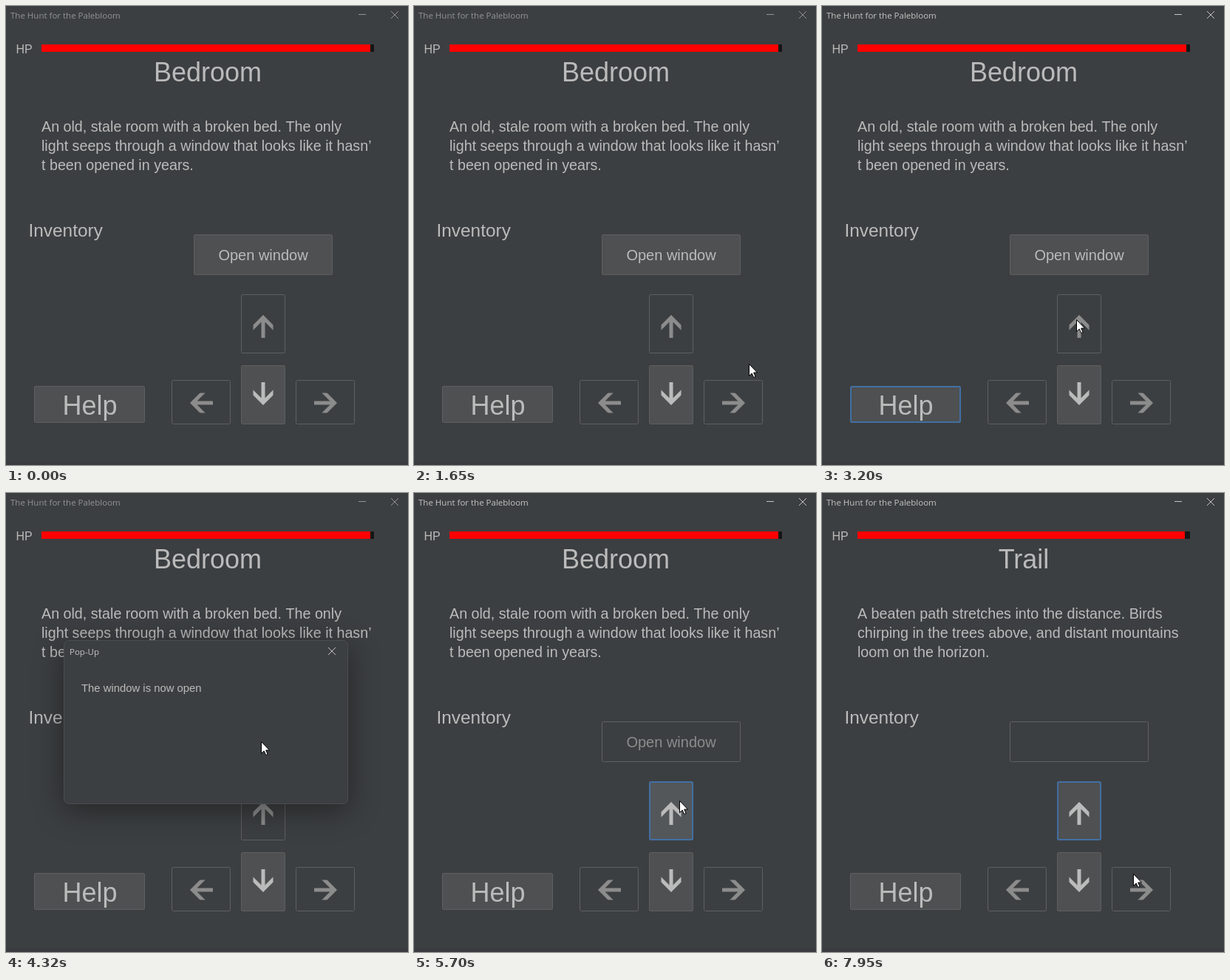
Animation of 544 by 621 pixels, one loop 7.99 s. Source, as an HTML page with a canvas:

```html
<!DOCTYPE html>
<html lang="en">
<head>
<meta charset="utf-8">
<title>Text adventure</title>
<style>
  html, body { margin: 0; width: 100%; height: 100%; overflow: hidden; background: #3c3f41; }
  canvas { display: block; }
</style>
</head>
<body>
<canvas id="stage" width="544" height="621"></canvas>
<script>
const ctx = document.getElementById('stage').getContext('2d');
const LOOP = 7990;
const SANS = '"Liberation Sans", Arial, sans-serif';
const UI = '"Open Sans", "Noto Sans", sans-serif';
const BG = '#3c3f41', FG = '#bbbbbb', DIM = '#8c8c8c', BRIGHT = '#c4c4c4';

// Moments at which the state changes, in ms
const ENTER = 600, ACTIVATE = 2820, POPUP = 4180, CLOSE = 5180, PRESS = 7210, TRAVEL = 7250;

const rooms = {
  bedroom: {
    name: 'Bedroom', hp: 445, action: 'Open window',
    text: ['An old, stale room with a broken bed. The only',
      'light seeps through a window that looks like it hasn’',
      't been opened in years.']
  },
  trail: {
    name: 'Trail', hp: 443, action: '',
    text: ['A beaten path stretches into the distance. Birds',
      'chirping in the trees above, and distant mountains',
      'loom on the horizon.']
  }
};

const rect = (x, y, w, h) => ({ x, y, w, h });
const actionBox = rect(254, 309, 188, 55);
const helpBox = rect(38, 514, 150, 50);
const upBox = rect(318, 390, 60, 80);
const downBox = rect(318, 486, 60, 80);
const leftBox = rect(224, 506, 80, 60);
const rightBox = rect(392, 506, 80, 60);

const clamp01 = v => Math.max(0, Math.min(1, v));
const progress = (t, from, to) => clamp01((t - from) / (to - from));
const smooth = u => u * u * (3 - 2 * u);
const easeOut = u => 1 - (1 - u) ** 3;

// Eased straight move to a point
const glide = (from, to, x, y) => ({
  from, to,
  at: (u, p) => ({ x: p.x + (x - p.x) * smooth(u), y: p.y + (y - p.y) * smooth(u) })
});

// Clockwise sweep on an ellipse, angles in turns, blending out of the previous point
const orbit = (from, to, cx, cy, rx, ry, angle, sweep) => {
  const point = u => {
    const a = (angle + sweep * u) * 2 * Math.PI;
    return { x: cx + rx * Math.cos(a), y: cy + ry * Math.sin(a) };
  };
  return {
    from, to,
    at: (u, p) => {
      const q = point(u), o = point(0);
      return { x: q.x + (p.x - o.x) * (1 - u), y: q.y + (p.y - o.y) * (1 - u) };
    }
  };
};

const entry = { x: 480, y: 545 };
const moves = [
  orbit(ENTER, 1370, 385, 488, 98, 103, 0.1, 0.75),
  glide(1400, 1650, 453, 484),
  orbit(1650, 2190, 368, 438, 84, 54, 0.08, 0.85),
  orbit(2210, 2440, 335, 440, 46, 26, 0, 0.75),
  glide(2440, 2520, 344, 424),
  glide(3660, 4000, 345, 336),
  glide(4460, 5000, 441, 214),
  glide(CLOSE, 5700, 359, 416),
  glide(5700, 5940, 345, 455),
  orbit(5980, 6700, 340, 425, 47, 34, 0.25, 1),
  glide(6700, 6830, 338, 435),
  glide(7690, 7950, 421, 515)
];

function pointerAt(t) {
  if (t < ENTER) return null;
  const p = moves.filter(m => t >= m.from)
    .reduce((at, m) => m.at(progress(t, m.from, m.to), at), entry);
  return { x: Math.round(p.x), y: Math.round(p.y) };
}

function label(str, x, y, font, color = FG, align = 'left') {
  ctx.font = font;
  ctx.fillStyle = color;
  ctx.textAlign = align;
  ctx.fillText(str, x, y);
}

function box(x, y, w, h, r) {
  ctx.beginPath();
  ctx.roundRect(x, y, w, h, r);
}

function cross(x, y, color) {
  ctx.strokeStyle = color;
  ctx.lineWidth = 1;
  ctx.beginPath();
  for (const s of [-1, 1]) {
    ctx.moveTo(x - 5, y - 5 * s);
    ctx.lineTo(x + 5, y + 5 * s);
  }
  ctx.stroke();
}

function button({ x, y, w, h }, { enabled = true, focus, hover, press } = {}) {
  box(x, y, w, h, 2.5);
  ctx.fillStyle = !enabled ? BG : press ? '#5a5e60' : hover ? '#53575a' : '#4e5051';
  ctx.fill();
  const line = focus ? 2 : 1;
  box(x + line / 2, y + line / 2, w - line, h - line, 2);
  ctx.lineWidth = line;
  ctx.strokeStyle = focus ? '#426fa3' : '#5e6060';
  ctx.stroke();
}

// Arrow centred on a point: a stem and a chevron cut off at both sides
function arrow(x, y, turns, enabled) {
  ctx.save();
  ctx.translate(x, y);
  ctx.rotate(turns * Math.PI / 2);
  ctx.beginPath();
  ctx.rect(-13.5, -15.5, 27, 31);
  ctx.clip();
  ctx.beginPath();
  ctx.moveTo(-20, 8);
  ctx.lineTo(0, -12);
  ctx.lineTo(20, 8);
  ctx.moveTo(0, -11);
  ctx.lineTo(0, 16);
  ctx.lineWidth = 5;
  ctx.strokeStyle = enabled ? FG : DIM;
  ctx.stroke();
  ctx.restore();
}

function titleBar(active) {
  const color = active ? BRIGHT : '#929394';
  label('The Hunt for the Palebloom', 6, 17, '11.5px ' + UI, color);
  ctx.fillStyle = color;
  ctx.fillRect(477, 11, 10, 1);
  cross(526, 12, color);
}

function popup(t, pointer) {
  const shown = easeOut(progress(t, POPUP, POPUP + 140)) * (1 - progress(t, CLOSE, CLOSE + 120));
  if (shown <= 0) return;
  const scale = 0.94 + 0.06 * shown;
  ctx.save();
  ctx.globalAlpha = shown;
  ctx.translate(270.5, 310);
  ctx.scale(scale, scale);
  ctx.translate(-270.5, -310);

  ctx.save();
  ctx.shadowColor = 'rgba(0,0,0,0.42)';
  ctx.shadowBlur = 40;
  ctx.shadowOffsetY = 9;
  box(78, 199, 385, 221, 7);
  ctx.fillStyle = BG;
  ctx.fill();
  ctx.restore();

  const onClose = t < CLOSE && pointer.x >= 418 && pointer.y < 229;
  if (onClose) {
    box(418, 199, 45, 30, [0, 7, 0, 0]);
    ctx.fillStyle = '#c42b1c';
    ctx.fill();
  }
  box(78.5, 199.5, 384, 221, 7);
  ctx.strokeStyle = '#4b4e50';
  ctx.lineWidth = 1;
  ctx.stroke();
  label('Pop-Up', 86, 219, '11.5px ' + UI, BRIGHT);
  cross(441, 214, onClose ? '#ffffff' : BRIGHT);
  label('The window is now open', 102, 269, '14.85px ' + SANS);
  ctx.restore();
}

function cursor({ x, y }) {
  ctx.save();
  ctx.translate(x + 0.5, y + 0.5);
  ctx.fill(pointerShape);
  ctx.stroke(pointerShape);
  ctx.restore();
}
const pointerShape = new Path2D('M0 0V16L3.7 12.5L6.2 18L8.6 17L6.2 11.5H11Z');

function draw(t) {
  const room = t < TRAVEL ? rooms.bedroom : rooms.trail;
  const pointer = pointerAt(t);
  const opened = t >= POPUP, closed = t >= CLOSE;
  const modal = opened && !closed;
  const over = r => pointer && !modal &&
    pointer.x >= r.x && pointer.x < r.x + r.w && pointer.y >= r.y && pointer.y < r.y + r.h;

  ctx.fillStyle = BG;
  ctx.fillRect(0, 0, 544, 621);
  ctx.fillStyle = '#393b40';
  ctx.fillRect(0, 616, 544, 5);
  titleBar(t >= ACTIVATE && !modal);

  label('HP', 13.5, 64, '16px ' + SANS);
  ctx.fillStyle = '#161616';
  ctx.fillRect(48, 52, 450, 10);
  ctx.fillStyle = '#ff0000';
  ctx.fillRect(48, 52, room.hp, 10);

  label(room.name, 273, 102, '36px ' + SANS, FG, 'center');
  room.text.forEach((row, i) => label(row, 48, 170 + 26 * i, '19.7px ' + SANS));
  label('Inventory', 30.5, 312, '24.4px ' + SANS);

  button(actionBox, { enabled: !opened, hover: over(actionBox) });
  label(room.action, 348, 344, '20px ' + SANS, opened ? DIM : FG, 'center');

  button(helpBox, { focus: t >= ACTIVATE && !opened });
  label('Help', 113.5, 553, '36px ' + SANS, FG, 'center');

  button(upBox, {
    enabled: closed,
    focus: closed,
    hover: t < TRAVEL && over(upBox),
    press: t >= PRESS && t < TRAVEL
  });
  arrow(348, 433.5, 0, closed);
  button(downBox, { hover: over(downBox) });
  arrow(348, 524.5, 2, true);
  button(leftBox, { enabled: false });
  arrow(264.5, 537, 3, false);
  button(rightBox, { enabled: false });
  arrow(432.5, 537, 1, false);

  if (opened) popup(t, pointer);
  if (pointer) {
    ctx.fillStyle = '#ffffff';
    ctx.strokeStyle = '#000000';
    ctx.lineWidth = 1;
    cursor(pointer);
  }
}

const start = performance.now();
function frame() {
  draw((performance.now() - start) % LOOP);
  requestAnimationFrame(frame);
}
frame();
</script>
</body>
</html>
```
